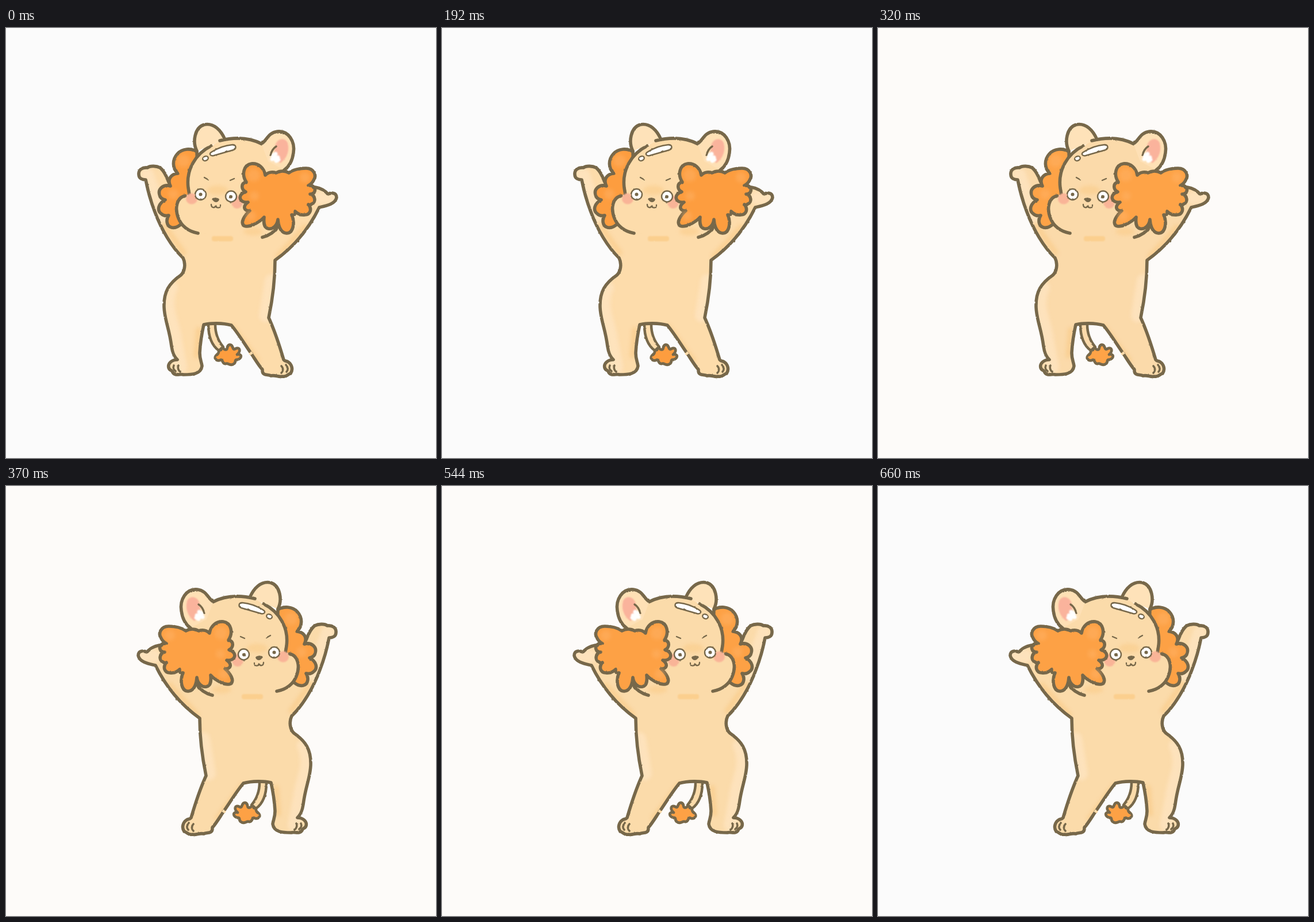
Write an HTML page that moves like this. It is 748 px wide and 748 px high and loops after 680 ms.

```html
<!DOCTYPE html>
<html lang="en">
<head>
<meta charset="utf-8">
<title>Dancing lion</title>
<style>
  html, body { margin: 0; width: 100%; height: 100%; overflow: hidden; background: var(--bg); }
  svg { display: block; width: 100%; height: 100%; }
  .line { fill: none; }
  .skin { fill: var(--skin); }
  .mane { fill: var(--mane); }
  .bare { stroke: none; }
  .thin { stroke-width: 2.4; }
  .white { fill: #fff; }
  .ink { fill: #77684a; stroke: none; }
</style>
</head>
<body>
<svg viewBox="0 0 748 748">
  <defs>
    <filter id="rough" x="220" y="155" width="366" height="465" filterUnits="userSpaceOnUse" color-interpolation-filters="sRGB">
      <feTurbulence type="fractalNoise" baseFrequency=".16" numOctaves="2" seed="4"/>
      <feDisplacementMap in="SourceGraphic" scale="2" xChannelSelector="R" yChannelSelector="G"/>
    </filter>
    <filter id="soft" x="-50%" y="-50%" width="200%" height="200%"><feGaussianBlur stdDeviation="3"/></filter>
    <filter id="dab" x="-50%" y="-50%" width="200%" height="200%"><feGaussianBlur stdDeviation="1.2"/></filter>
    <path id="body" d="M283,268 C279,257 273,247 268,243 C262,240 251,239 246,243 C238,242 230,246 231,255
      C231,262 238,264 243,264 C246,280 252,302 259,320 C270,350 288,381 308,400 C313,410 311,424 304,430
      C284,444 274,458 275,486 C276,509 284,522 288,554 C290,568 294,573 298,577 C289,577 281,583 283,591
      C285,597 289,594 290,599 C294,606 303,601 309,603 C322,603 339,603 341,588 C340,580 337,577 337,565
      C338,545 341,530 344,516 C357,513 377,513 392,517 C403,530 414,548 425,564 C432,574 440,588 446,594
      C445,606 456,602 461,605 C468,603 475,608 480,606 C488,608 491,601 495,601 C500,594 497,585 491,581
      C488,579 485,580 483,577 C478,560 469,530 457,504 C463,475 468,440 468,404 C503,379 528,347 545,312
      C558,309 573,306 575,295 C575,286 566,286 560,289 C556,284 549,279 538,277"/>
    <clipPath id="inside"><use href="#body"/></clipPath>
  </defs>

  <g id="lion" filter="url(#rough)" stroke="#77684a" stroke-width="5.6" stroke-linecap="round" stroke-linejoin="round">
    <!-- tail -->
    <path class="skin" d="M352,516 C352,536 358,552 370,561 L378,555 C368,543 364,531 364,516" stroke-width="4.500"/>
    <path class="mane" d="M374,560 C368,560 372,566 366,569 C361,573 365,580 372,578 C378,574 375,585 382,584
      C387,582 388,588 395,585 C402,582 396,577 402,577 C411,575 411,566 402,568 C409,562 407,554 399,558
      C393,562 396,550 389,551 C382,552 388,562 380,559 C377,556 374,556 374,560Z" stroke-width="4.800"/>

    <!-- body -->
    <use href="#body" class="skin bare"/>
    <g clip-path="url(#inside)">
      <g class="line" stroke="#fee5c3" stroke-width="24" filter="url(#soft)" opacity=".7">
        <path d="M287,452 C276,475 282,495 291,525 L303,590 M462,440 L452,500 M245,255 L272,330 M548,296 L572,294"/>
      </g>
      <g class="line" stroke="#f9ca87" stroke-width="9" filter="url(#soft)" opacity=".65">
        <path d="M275,343 L309,391 M335,525 L331,570 M393,520 L437,578 M473,397 L520,346"/>
      </g>
    </g>
    <use href="#body" class="line"/>
    <path class="line" d="M424.500,564 L427,568" style="stroke:var(--skin)" stroke-width="6" stroke-linecap="butt"/>
    <path class="line" d="M292,587 C290,591 292,595 295,597 M300,587 C298,591 300,596 303,598
      M479,588 C483,592 482,597 479,600 M487,586 C491,590 491,595 488,598" stroke-width="3.600"/>

    <!-- far side of the mane -->
    <path class="mane" d="M332,215 C322,209 307,209 298,219 C289,229 289,244 299,253 C287,254 280,263 286,275
      C274,271 264,280 267,290 C268,296 272,298 277,299 C265,305 262,317 270,323 C274,327 279,327 283,326
      C278,333 279,345 288,347 C296,349 302,344 307,339 L335,320Z"/>

    <!-- head -->
    <path class="skin bare" d="M446,202 C425,191 400,189 372,196 L357,205 C329,219 313,247 317,278 L318,290
      C299,291 293,312 300,331 C305,344 317,354 334,357 L446,364 C460,361 480,345 482,320 L490,240Z"/>
    <path fill="#fee2b9" d="M332,214 C324,198 328,173 345,168 C362,165 374,178 381,194"/>
    <path class="line" d="M372,196 C400,189 425,191 446,202 M357,205 C329,219 313,247 317,278 L319,290
      M312,292 C297,294 293,314 300,331 C305,344 317,354 334,357 M446,364 C458,361 467,355 473,345"/>
    <path class="bare" fill="#fee0b5" d="M444,201 C453,198 455,182 472,180 C492,178 503,198 500,217 C498,233 491,242 484,247 L456,232Z"/>
    <path class="bare" fill="#fab39c" filter="url(#dab)" d="M468,205 C471,192 485,189 490,200 C494,213 488,228 477,235 L466,224Z"/>
    <path class="line" stroke="#fff" stroke-width="7" filter="url(#dab)" d="M464,222 L469,219 M463,228 L473,225 M470,231 L474,229"/>
    <path class="line" d="M444,201 C453,198 455,182 472,180 C492,178 503,198 500,217 C498,233 491,242 484,247"/>
    <path class="line" d="M460,221 C462,214 465,209 470,206" stroke-width="3.500"/>

    <!-- face -->
    <g class="bare">
      <ellipse cx="368" cy="282" rx="18" ry="8" fill="#f9c983" opacity=".5" filter="url(#soft)"/>
      <rect x="358" y="362" width="37" height="9" rx="4" fill="#fbcf8e" filter="url(#dab)"/>
      <ellipse cx="430" cy="354" rx="17" ry="7" fill="#fbcc8a" opacity=".6" filter="url(#soft)"/>
      <ellipse cx="323" cy="297" rx="10" ry="9.500" fill="#f9b497" filter="url(#dab)"/>
      <ellipse cx="402" cy="303" rx="10" ry="11" fill="#f9b497" filter="url(#dab)"/>
    </g>
    <g class="thin white">
      <circle cx="338.500" cy="289.500" r="9.500"/>
      <circle cx="391.500" cy="293" r="9.500"/>
      <path d="M357,216 C368,209 382,204 394,203 C401,203 401,210 396,212 L361,222 C355,223 353,219 357,216Z"/>
      <ellipse cx="347" cy="227" rx="5" ry="3.700" transform="rotate(-25 347 227)"/>
    </g>
    <circle class="ink" cx="338.500" cy="289.500" r="3"/>
    <circle class="ink" cx="391" cy="293.500" r="3"/>
    <path class="ink" d="M358,298 C360,294 369,295 371,298 C370,303 365,304 362,302Z"/>
    <path class="line thin" d="M357,307 C357,313 363,314 365,309 C366,314 373,314 373,308 M345,260 L352,264 M390,265 L397,262"/>

    <!-- near side of the mane -->
    <path class="mane" d="M418,268 C409,254 414,238 427,236 C440,235 449,244 451,256 C457,250 464,250 470,252
      C476,248 486,248 492,252 C499,247 510,244 522,244 C536,244 541,257 535,265 C533,269 530,272 526,274
      C534,273 539,278 537,284 C536,288 533,289 529,289 C539,291 539,304 532,306 C530,308 528,308 526,307
      C533,315 529,325 520,325 C513,326 507,323 503,319 C504,325 500,325 497,325 C503,338 500,357 488,357
      C477,356 474,345 473,333 C472,342 465,351 456,349 C448,347 448,338 449,329 C441,338 423,348 414,344
      C407,338 415,326 424,318 C414,319 411,310 421,303 C405,305 402,289 417,285 C409,281 408,270 418,268Z"/>
    <g class="bare" fill="#ffb469" opacity=".45" filter="url(#soft)">
      <circle cx="431" cy="256" r="11"/>
      <circle cx="426" cy="327" r="9"/>
      <circle cx="432" cy="292" r="8"/>
      <circle cx="520" cy="260" r="9"/>
      <circle cx="309" cy="231" r="11"/>
      <circle cx="291" cy="289" r="9"/>
    </g>
  </g>
</svg>
<script>
  const lion = document.getElementById("lion");
  const root = document.documentElement.style;
  const LOOP = 680;
  const steps = [
    { until: 320, flip: false, bg: "#fbfbfb", skin: "#fddcab", mane: "#fd9d3f" },
    { until: 370, flip: false, bg: "#fdfbf9", skin: "#fbdaaa", mane: "#fea347" },
    { until: 660, flip: true, bg: "#fdfbf9", skin: "#fbdbaa", mane: "#fda145" },
    { until: LOOP, flip: true, bg: "#fbfbfb", skin: "#fbdbaa", mane: "#fda145" }
  ];
  let shown;

  function draw(now) {
    const step = steps.find(s => now % LOOP < s.until);
    if (step !== shown) {
      shown = step;
      for (const name of ["bg", "skin", "mane"]) root.setProperty("--" + name, step[name]);
      lion.setAttribute("transform", step.flip ? "matrix(-1 0 0 1 805 0)" : "");
    }
    requestAnimationFrame(draw);
  }
  draw(0);
</script>
</body>
</html>
```
